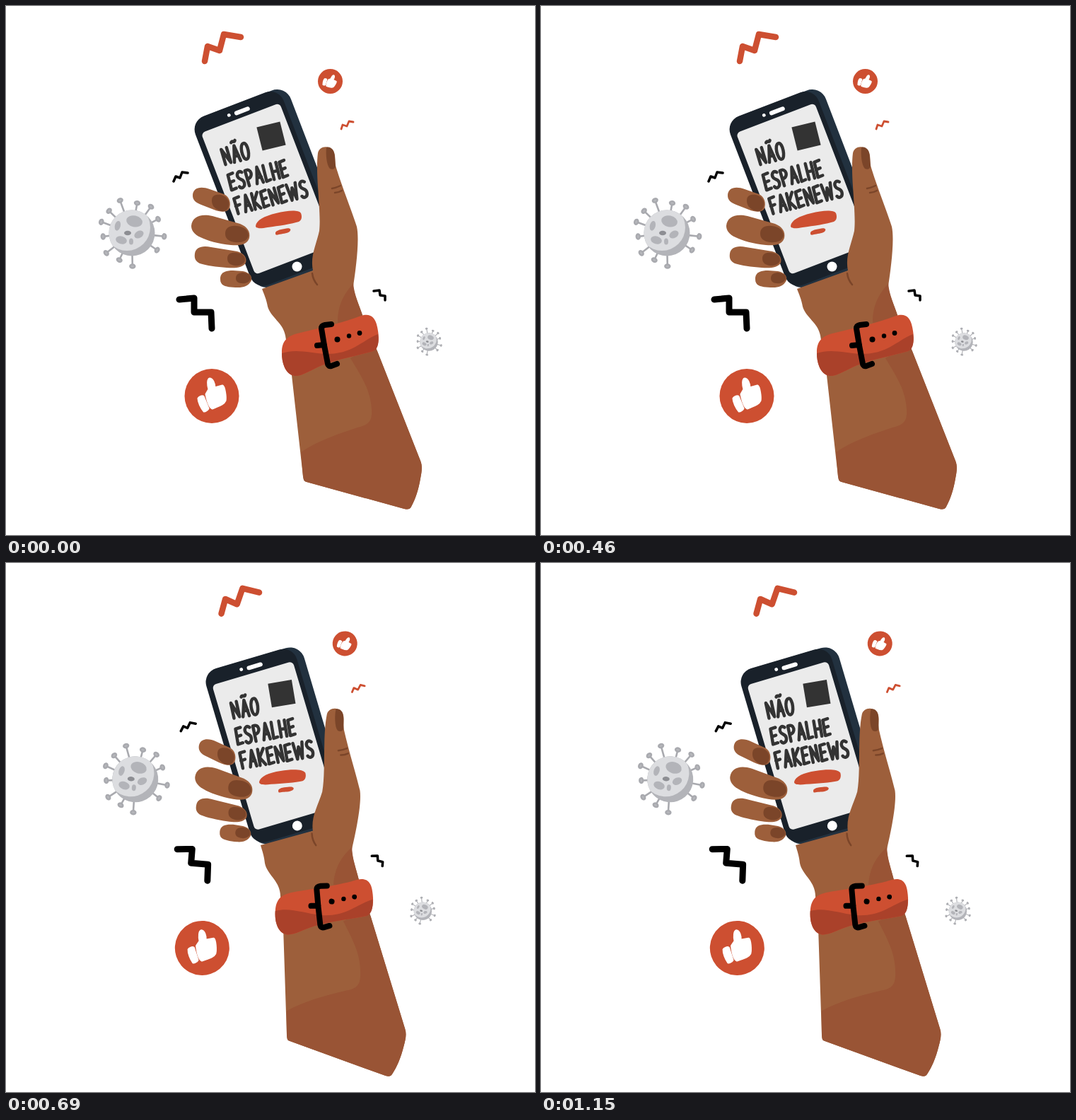
These frames come from a looping animation (748 by 748 pixels, 1380 ms). An HTML page:

```html
<!DOCTYPE html>
<html lang="pt">
<head>
<meta charset="utf-8">
<style>
html, body { margin: 0; width: 100%; height: 100%; overflow: hidden; background: #fff }
svg { display: block; width: 100%; height: 100% }
.line { fill: none; stroke-linecap: round; stroke-linejoin: round }
</style>
</head>
<body>
<svg viewBox="0 0 748 748">
  <defs>
    <clipPath id="ball"><circle r="32.5"/></clipPath>
    <g id="virus">
      <g id="spikes" class="line" stroke="#a9aaaf" stroke-width="2.6"></g>
      <circle r="32.5" fill="#b3b4b9"/>
      <circle cx="-7" cy="-8" r="33" fill="#dcdde0" clip-path="url(#ball)"/>
      <g fill="#b3b4b9">
        <ellipse cx="0" cy="-17" rx="11.5" ry="8" transform="rotate(12)"/>
        <ellipse cx="-22" cy="-5" rx="4" ry="7" transform="rotate(14)"/>
        <ellipse cx="-15" cy="10" rx="8" ry="5.5" transform="rotate(15 -15 10)"/>
        <ellipse cx="10" cy="2" rx="7" ry="5" transform="rotate(-30 10 2)"/>
        <ellipse cx="-1" cy="12" rx="3" ry="4.5"/>
        <ellipse cx="-6" cy="0" rx="5" ry="3.2" fill="#8d8e93"/>
      </g>
    </g>
    <g id="thumb" fill="#fff" stroke="#fff" stroke-width="3" stroke-linejoin="round">
      <path d="M-19 4C-18 2-14 0-12 1L-5 18C-6 20-9 22-11 22C-15 17-19 9-19 4Z"/>
      <path d="M-8-2L-4-9C-6-16-6-23-3-24C1-24 4-17 4-11L15-14C18-13 20 2 19 7C17 12 10 14 1 18C-3 17-6 8-8-2Z"/>
    </g>
  </defs>

  <g id="scene">
    <g class="line">
      <path d="M281 78L285 57L302 63L308 40L332 44" stroke="#cd4f31" stroke-width="8.5"/>
      <path d="M474 174L476 168L482 170L485 163L491 164" stroke="#cd4f31" stroke-width="2.8"/>
      <path d="M237 248L240 241L246 243L249 235L257 236" stroke="#000" stroke-width="3.5"/>
      <path d="M245 415L266 413L266 433L290 433L291 456" stroke="#000" stroke-width="9"/>
      <path d="M520 403L528 402L529 409L536 410L536 416" stroke="#000" stroke-width="3.5"/>
    </g>

    <use href="#virus" transform="translate(178 321)"/>
    <use href="#virus" transform="translate(598 475) rotate(10) scale(.39)"/>

    <g fill="#cd4f31">
      <circle cx="291" cy="551.5" r="38.5"/>
      <circle cx="458.5" cy="106.5" r="17.5"/>
    </g>
    <use href="#thumb" transform="translate(291 551)"/>
    <use href="#thumb" transform="translate(458 107) rotate(40) scale(.44)"/>

    <!-- phone -->
    <g transform="translate(277 183) rotate(-21)">
      <rect x="-5" y="-24" width="141" height="259" rx="21" fill="#22313f"/>
      <rect x="-8" y="-24.5" width="133.5" height="255.5" rx="20" fill="#19212a"/>
      <rect y="-3.5" width="119" height="214.5" rx="6" fill="#ebebeb"/>
      <rect x="54" y="-15" width="23" height="6" rx="3" fill="#fff"/>
      <circle cx="46" cy="-13" r="2.4" fill="#fff"/>
    </g>
    <rect x="-17" y="-17" width="34" height="34" fill="#333" transform="translate(375 184) rotate(-14)"/>
    <g id="words" class="line" stroke="#333" stroke-width="4.5"></g>
    <g fill="#cd4f31">
      <path d="M353 311C354 303 365 297 382 293C398 289 414 288 417 293C419 298 418 303 414 305C405 308 385 311 370 313C360 315 353 315 353 311Z"/>
      <path d="M381 322C380 318 387 316 394 315C402 313 404 316 401 319C397 322 390 322 386 323C383 324 381 324 381 322Z"/>
    </g>

    <!-- arm and thumb -->
    <path fill="#9d5f3b" d="M362 400L434 374C430 354 438 340 443 318C446 290 437 240 441 208C443 198 456 196 463 205C467 212 464 220 467 229C476 258 489 290 496 312C500 330 495 370 491 396C492 408 500 424 505 440L525 488L586 643C589 650 588 658 586 668C583 685 579 697 573 708C571 712 568 712 563 711L425 673C421 672 421 670 420 665L404 522L395 466C392 448 374 440 370 425C368 414 365 408 362 400Z"/>
    <g fill="#995435">
      <path d="M417 631C440 615 470 605 497 596C515 592 518 585 517 570C515 540 500 520 487 498L520 478L525 488L586 643C589 650 588 658 586 668C583 685 579 697 573 708C571 712 568 712 563 711L425 673C421 672 421 670 420 665Z"/>
      <path d="M491 392C484 402 469 415 469 448L507 444L505 440C500 424 492 408 491 392Z"/>
    </g>
    <path fill="#7b4529" d="M453 200C452 208 453 225 458 230C462 232 466 230 466 226C465 215 465 205 461 202C458 199 455 199 453 200Z"/>
    <path class="line" stroke="#7b4529" stroke-width="2.5" d="M461 258Q467 257 473 254M465 264Q470 264 475 261M433 378Q434 387 440 394"/>
    <circle cx="411.5" cy="368.5" r="7" fill="#fff"/>

    <!-- fingers -->
    <g fill="#9d5f3b">
      <path d="M264 268C264 257 275 254 288 259L308 266C317 270 318 280 316 286C313 292 304 292 294 288L276 281C268 278 264 274 264 268Z"/>
      <path d="M262 311C263 298 275 293 292 297L331 308C341 312 346 319 344 328C341 338 330 339 318 338C300 336 285 332 275 327C266 323 262 317 262 311Z"/>
      <path d="M267 350C268 341 278 338 290 341L327 347C337 350 341 356 339 363C335 370 325 371 312 370C298 369 283 367 274 364C268 361 266 357 267 350Z"/>
      <path d="M303 384C304 376 312 374 321 374L335 375C344 377 348 381 347 388C343 396 336 398 328 398C318 398 310 397 306 394C303 391 303 388 303 384Z"/>
    </g>
    <g fill="#7b4529">
      <path d="M291 275C291 268 296 266 304 267C312 269 317 276 315 283C313 290 308 292 301 289C294 286 291 281 291 275Z"/>
      <path d="M310 322C310 313 317 310 326 311C337 312 343 317 343 325C341 333 332 335 324 334C315 333 310 329 310 322Z"/>
      <path d="M313 357C313 350 319 348 326 349C334 350 339 354 338 360C336 366 329 368 323 367C317 366 313 363 313 357Z"/>
      <path d="M325 385C325 379 330 377 336 377C343 378 347 381 346 386C344 391 338 393 333 392C328 392 325 389 325 385Z"/>
    </g>

    <!-- strap -->
    <path fill="#cd4f31" d="M390 490C390 473 398 467 412 463C445 455 480 447 502 438C514 434 521 439 524 450C528 465 529 482 519 488C500 494 470 499 447 508C430 515 418 524 408 523C395 521 390 505 390 490Z"/>
    <path fill="#aa412a" d="M390 491C410 484 430 491 455 492C490 492 505 472 526 464C528 478 525 486 519 488C500 494 470 499 447 508C430 515 418 524 408 523C395 521 390 505 390 491Z"/>
    <path class="line" stroke="#000" stroke-width="8" d="M460 450L451 451Q446 452 446 456L450 480L455 506Q456 510 460 509L468 506M440 480L450 479"/>
    <circle cx="468.5" cy="471.5" r="4"/>
    <circle cx="485" cy="466.5" r="3.2"/>
    <circle cx="500" cy="462.5" r="3.4"/>
  </g>
</svg>
<script>
const get = id => document.getElementById(id);

// Brush letters: [width, strokes], 23 units tall
const letters = {
  N: [9, 'M1 23L0 1L9 22L8 0'],
  A: [9, 'M0 23L5 0L9 23M2 15H8'],
  Ã: [9, 'M0 23L5 0L9 23M2 15H8M2-5Q3-7 5-6T8-7'],
  O: [9, 'M5 0C-2 0-2 23 4 23S11 0 5 0Z'],
  E: [7, 'M7 0L0 1V23L7 22M0 12L6 11'],
  S: [8, 'M8 2C4-2 0 2 1 7C2 12 8 11 8 17C8 24 2 25 0 21'],
  P: [7.5, 'M1 23L0 1C10-2 10 13 1 13'],
  L: [6, 'M0 0V23L6 22'],
  H: [8, 'M0 0V23M8 0V23M0 12H8'],
  F: [7, 'M1 23L0 1L7 0M0 12L6 11'],
  K: [8, 'M0 0V23M8 0L1 12L8 23'],
  W: [13, 'M0 0L3 23L7 6L10 23L13 0']
};

function lettering(word, x, y) {
  let pos = 0, out = '';
  for (const c of word) {
    const [width, strokes] = letters[c];
    out += `<path d="${strokes}" transform="translate(${pos})"/>`;
    pos += width + 4.9;
  }
  return `<g role="img" aria-label="${word}" transform="translate(${x} ${y}) rotate(-14)">${out}</g>`;
}

get('words').innerHTML = lettering('NÃO', 304, 202) +
  lettering('ESPALHE', 313.5, 238) + lettering('FAKENEWS', 322, 271.5);

// Each spike: [angle, length]
const spikes = [[-110, 49], [-80, 43], [-54, 46], [-28, 42], [6, 46], [34, 43],
  [89, 47], [115, 42], [142, 46], [173, 41], [200, 46], [224, 45]];
get('spikes').innerHTML = spikes.map(([angle, len]) =>
  `<g transform="rotate(${angle})"><path d="M30 0H${len}"/>
   <ellipse cx="${len}" rx="2.4" ry="3.4" fill="#b8b9bd"/></g>`).join('');

const STEP = 230;
function draw(now) {
  const tilt = Math.floor(now / STEP) % 2 ? 4.5 : 0;
  get('scene').setAttribute('transform', `rotate(${tilt} 374 374)`);
  requestAnimationFrame(draw);
}
draw(0);
</script>
</body>
</html>
```
